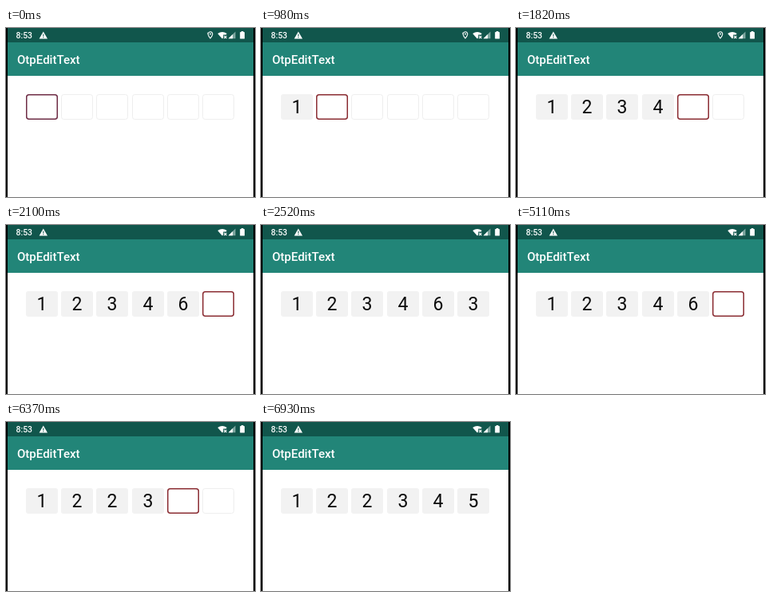
An HTML page with a canvas that plays this animation: 312 px wide and 212 px high, repeating every 7560 ms.

```html
<!DOCTYPE html>
<html lang="en">
<head>
<meta charset="utf-8">
<title>OtpEditText</title>
<style>
  html, body { margin: 0; width: 100%; height: 100%; overflow: hidden; background: #fff; }
  canvas, svg { position: absolute; left: 0; top: 0; display: block; }
  text { font-family: Roboto, Arial, sans-serif; }
  .bar { fill: #fff; font-weight: 500; }
  #digits { font-size: 23px; text-anchor: middle; fill: #0c0c0c; }
</style>
</head>
<body>
<canvas id="stage" width="312" height="212"></canvas>
<svg width="312" height="212">
  <text class="bar" x="12.5" y="13" font-size="10.4">8:53</text>
  <text class="bar" x="14" y="45" font-size="15">OtpEditText</text>
  <g id="digits"></g>
</svg>
<script>
const LOOP = 7560, COUNT = 6, PITCH = 44.2;
const PIN_OFF = 1960;
// [time, code typed so far]
const STEPS = [
  [0, ''], [980, '1'], [1260, '12'], [1540, '123'], [1820, '1234'],
  [2100, '12346'], [2520, '123463'], [5110, '12346'], [5460, '1234'],
  [5670, '123'], [5880, '12'], [6090, '122'], [6370, '1223'],
  [6650, '12234'], [6930, '122345']
];
const ctx = document.getElementById('stage').getContext('2d');
const group = document.getElementById('digits');
const boxX = i => Math.round(25 + i * PITCH);

const labels = Array.from({ length: COUNT }, (_, i) => {
  const el = document.createElementNS('http://www.w3.org/2000/svg', 'text');
  el.setAttribute('x', boxX(i) + 20);
  el.setAttribute('y', 107);
  group.appendChild(el);
  return el;
});

function rect(color, x, y, w, h) {
  ctx.fillStyle = color;
  ctx.fillRect(x, y, w, h);
}

function poly(color, ...pts) {
  ctx.fillStyle = color;
  ctx.beginPath();
  pts.forEach(([x, y]) => ctx.lineTo(x, y));
  ctx.closePath();
  ctx.fill();
}

function rounded(x, y, w, h, r) {
  ctx.beginPath();
  ctx.roundRect(x, y, w, h, r);
}

function outline(x, color, width) {
  const d = width / 2;
  rounded(x + d, 83 + d, 40 - width, 32 - width, 3);
  ctx.strokeStyle = color;
  ctx.lineWidth = width;
  ctx.stroke();
}

function drawPin() {
  ctx.strokeStyle = '#fff';
  ctx.lineWidth = 1.1;
  ctx.beginPath();
  ctx.arc(256, 7.6, 2.8, Math.PI * 0.9, Math.PI * 0.1);
  ctx.quadraticCurveTo(258.2, 10.6, 256, 13);
  ctx.quadraticCurveTo(253.8, 10.6, 253.3, 8.4);
  ctx.closePath();
  ctx.stroke();
  ctx.fillStyle = '#fff';
  ctx.beginPath();
  ctx.arc(256, 7.6, 1, 0, Math.PI * 2);
  ctx.fill();
}

function drawWifi() {
  ctx.fillStyle = '#fff';
  ctx.beginPath();
  ctx.moveTo(265.2, 7);
  ctx.quadraticCurveTo(271, 2.8, 276.8, 7);
  ctx.lineTo(275.6, 8.4);
  ctx.lineTo(272.2, 8.4);
  ctx.lineTo(272.2, 12.2);
  ctx.lineTo(271, 13.4);
  ctx.closePath();
  ctx.fill();
  ctx.strokeStyle = '#fff';
  ctx.lineWidth = 1.1;
  ctx.beginPath();
  ctx.moveTo(273.2, 9.8);
  ctx.lineTo(276.4, 13);
  ctx.moveTo(276.4, 9.8);
  ctx.lineTo(273.2, 13);
  ctx.stroke();
}

function drawStatus(pin) {
  rect('#11564c', 0, 0, 312, 18);
  poly('#fff', [46.8, 4.6], [52, 13.4], [41.6, 13.4]);
  rect('#11564c', 46.3, 7.6, 1.1, 2.8);
  rect('#11564c', 46.3, 11.2, 1.1, 1.1);
  if (pin) drawPin();
  drawWifi();
  poly('#7fa7a1', [287.5, 4.5], [287.5, 13.3], [278.7, 13.3]);
  poly('#fff', [284, 8], [284, 13.3], [278.7, 13.3]);
  ctx.fillStyle = '#fff';
  rounded(293.2, 5, 5.8, 8.6, 0.7);
  ctx.fill();
  rect('#fff', 294.8, 4, 2.6, 1.2);
}

function drawBox(i, code, focus) {
  const x = boxX(i);
  if (i < code.length) {
    rounded(x, 83, 40, 32, 3);
    ctx.fillStyle = '#f2f2f2';
    ctx.fill();
  } else if (i === code.length) {
    outline(x, focus, 1.5);
  } else {
    outline(x, '#eeeeee', 1);
  }
  const digit = code[i] || '';
  if (labels[i].textContent !== digit) labels[i].textContent = digit;
}

function draw() {
  const t = performance.now() % LOOP;
  const code = STEPS.filter(s => s[0] <= t).pop()[1];
  rect('#fff', 0, 0, 312, 212);
  drawStatus(t < PIN_OFF);
  rect('#228578', 0, 18, 312, 42);
  const focus = t < 70 ? '#6e2c45' : '#8a2c32';
  for (let i = 0; i < COUNT; i++) drawBox(i, code, focus);
  rect('#000', 0, 0, 2, 212);
  rect('#000', 310, 0, 2, 212);
  requestAnimationFrame(draw);
}
draw();
</script>
</body>
</html>
```
